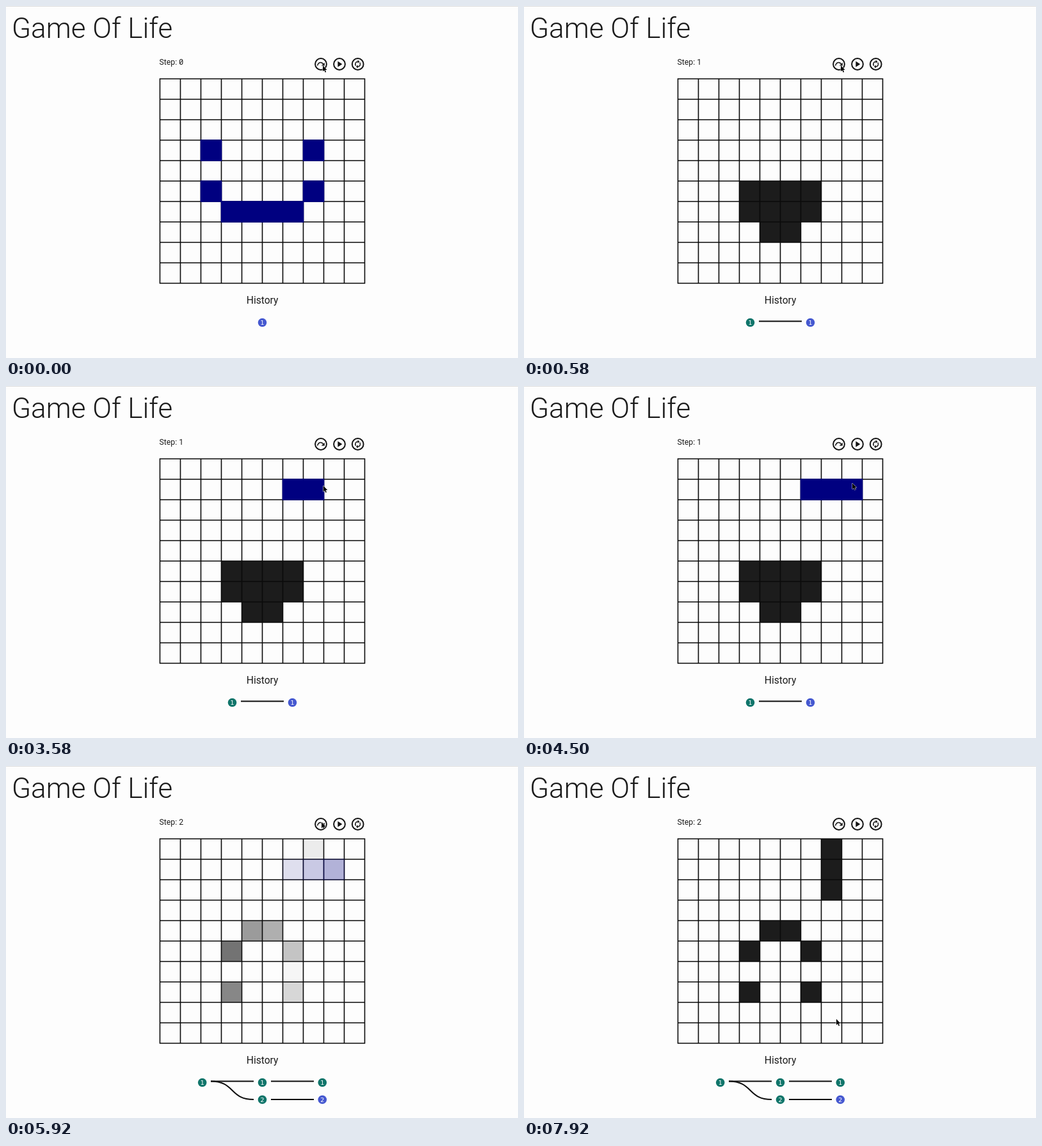
An HTML page that plays this animation: 800 by 551 pixels, repeating every 8000 ms.

```html
<!DOCTYPE html>
<html lang="en">
<head>
<meta charset="utf-8">
<title>Game Of Life</title>
<style>
  html, body { margin: 0; width: 100%; height: 100%; overflow: hidden; background: #fdfdfd; }
  svg { display: block; width: 800px; height: 551px; }
  text { font-family: Roboto, "Open Sans", sans-serif; fill: #1b1b1b; }
  .title { font-size: 44px; font-weight: 300; }
  .step { font-size: 12.3px; }
  .label { font-size: 15.6px; text-anchor: middle; }
  .node text { font: 9.5px "DejaVu Sans", sans-serif; fill: #fff; text-anchor: middle; }
  .line { fill: none; stroke: #0c0c0c; stroke-width: 2; }
  .icon { fill: none; stroke: #141414; stroke-width: 2; }
  .solid { fill: #141414; stroke: none; }
</style>
</head>
<body>
<svg id="stage" viewBox="0 0 800 551">
  <rect width="800" height="1" fill="#dedede"/>
  <text class="title" x="9" y="50">Game Of Life</text>
  <text class="step" x="239.5" y="92">Step: <tspan id="count">0</tspan></text>
  <path id="slash" d="M271.8 90.3L275.6 84.6" stroke="#1b1b1b"/>

  <g class="icon" transform="translate(492 91)">
    <circle r="8.9"/>
    <path d="M-5.4 2.4C-3.8 -3.6 1.5 -3.8 4.2 .6" stroke-width="1.5"/>
    <path class="solid" d="M5.8 -2.6V2.4H.8Z"/>
  </g>
  <g class="icon" transform="translate(521 91)">
    <circle r="8.9"/>
    <path class="solid" d="M-2.6 -4.4L4.4 0L-2.6 4.4Z"/>
  </g>
  <g class="icon" transform="translate(549.7 91)">
    <circle r="8.9"/>
    <g id="half">
      <path d="M-2.9 2.6A3.9 3.9 0 0 1 0 -3.9" stroke-width="1.5"/>
      <path class="solid" d="M-.2 -6.6L2.8 -3.9L-.2 -1.2Z"/>
    </g>
    <use href="#half" transform="rotate(180)"/>
  </g>

  <g id="dark" fill="#1c1c1c"></g>
  <path id="grid" fill="none" stroke="#0a0a0a" stroke-width="1.6"/>
  <g id="navy" fill="#000080"></g>

  <text class="label" x="400.6" y="465.5">History</text>
  <g id="history"></g>
  <path id="cursor" d="M0 0V9.4L2.2 7.5L3.7 10.9L5.2 10.2L3.8 7H6.6Z"
        fill="#050505" stroke="#fff" stroke-width=".9" paint-order="stroke"/>
</svg>
<script>
const LOOP = 8000, TICK = 1000 / 12;
const SIZE = 10, CELL = 32, LEFT = 240.5, TOP = 114;
const FADE = 200, TRAIL = 18, DRAW = 400;
const STEPS = [60, 5560];
const BLUE = '#4558d0', TEAL = '#10756a';

const $ = id => document.getElementById(id);
const clamp = v => Math.max(0, Math.min(1, v));

function add(parent, tag, attrs) {
  const el = document.createElementNS('http://www.w3.org/2000/svg', tag);
  for (const name in attrs) el.setAttribute(name, attrs[name]);
  parent.appendChild(el);
  return el;
}

// Board: a cell's key is column * 10 + row
let lines = '';
for (let i = 0; i <= SIZE; i++) {
  lines += `M${LEFT + i * CELL} ${TOP - .8}v321.6M${LEFT - .8} ${TOP + i * CELL}h321.6`;
}
$('grid').setAttribute('d', lines);

function nextGeneration(alive) {
  const live = new Set(alive), next = [];
  const has = (c, r) => c >= 0 && r >= 0 && c < SIZE && r < SIZE && live.has(c * SIZE + r);
  for (let c = 0; c < SIZE; c++) {
    for (let r = 0; r < SIZE; r++) {
      let n = -has(c, r);
      for (let dc = -1; dc < 2; dc++) {
        for (let dr = -1; dr < 2; dr++) n += has(c + dc, r + dr);
      }
      if (n === 3 || (n === 2 && has(c, r))) next.push(c * SIZE + r);
    }
  }
  return next;
}

const cells = [];
function makeCell(key, layer, on) {
  const pad = layer === 'navy' ? .8 : 0;
  const el = add($(layer), 'rect', {
    x: LEFT + Math.floor(key / SIZE) * CELL - pad,
    y: TOP + key % SIZE * CELL - pad,
    width: CELL + 2 * pad, height: CELL + 2 * pad
  });
  const cell = { key, el, on, off: Infinity };
  cells.push(cell);
  return cell;
}

// Old cells leave one after another, then the new ones enter
function advance(list, start) {
  list.forEach((cell, i) => { cell.off = start + i * TRAIL; });
  return nextGeneration(list.map(cell => cell.key))
    .map((key, i) => makeCell(key, 'dark', start + (list.length + i) * TRAIL));
}

let board = [23, 25, 36, 46, 56, 66, 73, 75].map(key => makeCell(key, 'navy', -FADE));
board = advance(board, STEPS[0]);
const clicks = [[61, 2870], [71, 3380], [81, 3790]];
board.push(...clicks.map(([key, at]) => makeCell(key, 'navy', at)));
advance(board, STEPS[1]);

// History: one tree per step
const trees = [0, 1, 2].map(() => add($('history'), 'g', {}));
const growing = [];

function node(tree, x, y, label, color) {
  const g = add(trees[tree], 'g', { class: 'node', transform: `translate(${x} ${y})` });
  add(g, 'circle', { r: 6.8, fill: color });
  add(g, 'text', { y: 3.4 }).textContent = label;
}
function link(tree, d, start) {
  const el = add(trees[tree], 'path', { class: 'line', d });
  if (start !== undefined) growing.push({ el, start });
}

node(0, 400.5, 495.5, 1, BLUE);
node(1, 353.5, 495.5, 1, TEAL);
node(1, 447.5, 495.5, 1, BLUE);
link(1, 'M367 493.5h67', STEPS[0]);
for (const x of [306.7, 400.5, 494.3]) node(2, x, 495.5, 1, TEAL);
node(2, 400.5, 522.3, 2, TEAL);
node(2, 494.3, 522.3, 2, BLUE);
link(2, 'M320 493.5h67');
link(2, 'M414 493.5h67', STEPS[1]);
link(2, 'M320 493.5C358 493.5 349 522 387 522', STEPS[1]);
link(2, 'M414 522h67', STEPS[1]);

// Pointer: time, x, y
const path = [
  [0, 495, 93], [1000, 495, 93], [1830, 452, 139], [2250, 452, 139],
  [2580, 447.5, 158], [2950, 447.5, 158], [3250, 480, 157], [3420, 480, 157],
  [3750, 512, 155], [4250, 512, 155], [4500, 513, 152], [4580, 513, 151],
  [5080, 494, 84], [5170, 493, 88], [6250, 493, 88], [6420, 475, 112],
  [6670, 466, 115], [6920, 466, 115], [7750, 486, 402], [7917, 488, 396],
  [8000, 488, 396]
];
function pointerAt(t) {
  const i = path.findIndex(p => p[0] > t);
  const [a, b] = [path[i - 1], path[i]];
  const k = (t - a[0]) / (b[0] - a[0]);
  const e = k * k * (3 - 2 * k);
  return [a[1] + (b[1] - a[1]) * e, a[2] + (b[2] - a[2]) * e];
}

function render(t) {
  const step = STEPS.filter(s => t >= s).length;
  $('count').textContent = step;
  $('slash').style.display = step ? 'none' : '';
  trees.forEach((g, i) => { g.style.display = i === step ? '' : 'none'; });
  for (const { el, on, off } of cells) {
    el.setAttribute('opacity', clamp((t - on) / FADE) * (1 - clamp((t - off) / FADE)));
  }
  for (const { el, start } of growing) {
    el.setAttribute('stroke-dasharray', `${100 * clamp((t - start) / DRAW)} 200`);
  }
  $('cursor').setAttribute('transform', `translate(${pointerAt(t)})`);
}

const begin = performance.now();
function frame() {
  const t = Math.max(0, performance.now() - begin) % LOOP;
  render(Math.min(Math.floor((t + 4) / TICK) * TICK, LOOP - TICK));
  requestAnimationFrame(frame);
}
render(0);
requestAnimationFrame(frame);
</script>
</body>
</html>
```
